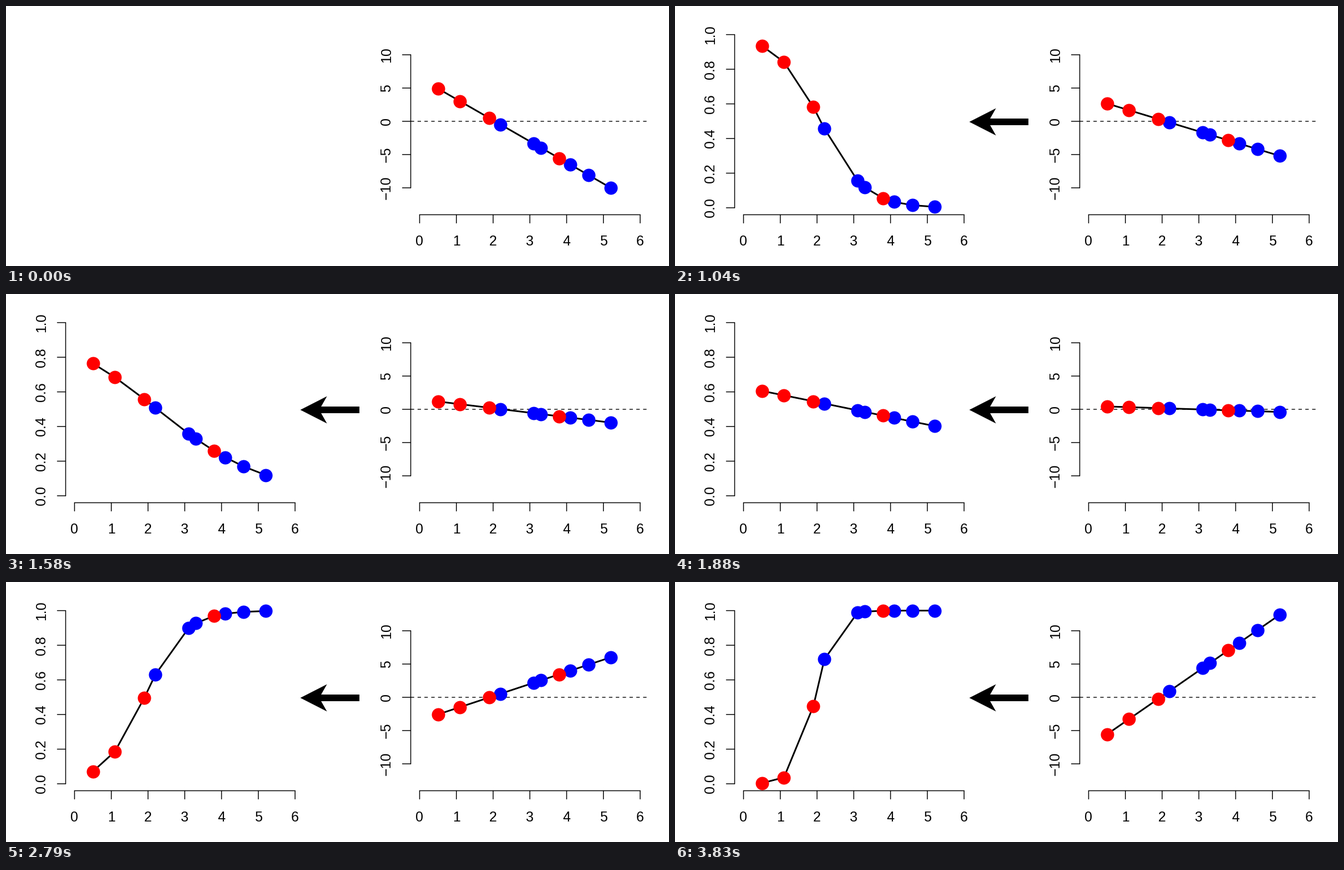
Animation, 1195 px wide and 469 px high, one loop 3870 ms. Source, as a matplotlib script:

```python
import numpy as np
import matplotlib.pyplot as plt
from matplotlib.animation import FuncAnimation
from matplotlib.patches import Polygon, Rectangle

W, H, DPI = 1195, 469, 100
PX = 72 / DPI          # points per pixel
STEP, FRAMES = 30, 129
UNIT = 66.25           # pixels per unit along x

X = np.array([0.5, 1.1, 1.9, 2.2, 3.1, 3.3, 3.8, 4.1, 4.6, 5.2])
RED = np.isin(X, [0.5, 1.1, 1.9, 3.8])

# The line tilts in 14 equal jumps; the first few come slightly late.
K = np.arange(1, 15)
LATE = np.where(K < 3, 2, np.where(K == 3, 1, 0))
TURNS = (np.floor(6.5 * K) + LATE) * 1000 / 24
FADE_START, FADE_LEN = 20, 240

plt.rcParams["font.family"] = "Liberation Sans"
fig = plt.figure(figsize=(W / DPI, H / DPI), dpi=DPI, facecolor="white")
ax = fig.add_axes([0, 0, 1, 1])
ax.set_xlim(0, W)
ax.set_ylim(H, 0)
ax.axis("off")


def stroke(xs, ys, width=1.5, **kw):
    kw.setdefault("solid_capstyle", "round")
    return ax.plot(xs, ys, color="black", lw=width * PX, snap=False, **kw)[0]


def label(x, y, text, angle=0):
    ax.text(x, y, text, fontsize=25 * PX, rotation=angle, ha="center",
            va="baseline", rotation_mode="anchor")


def draw_axes(left, axis_x, ticks):
    """Axes for one chart; ticks is a list of (pixel y, text)."""
    base = 376.5
    stroke([left, left + 6 * UNIT], [base, base])
    for i in range(7):
        x = left + i * UNIT
        stroke([x, x], [base, base + 15])
        label(x, 432, str(i))
    stroke([axis_x, axis_x], [ticks[0][0], ticks[-1][0]])
    for y, text in ticks:
        stroke([axis_x - 15, axis_x], [y, y])
        label(axis_x - 36.3, y, text, 90)


def prob_y(p):
    return 364 - 312.4 * p


def logit_y(v):
    return 208 - 12 * v


class Series:
    def __init__(self, left, to_pixel):
        self.x = left + X * UNIT
        self.to_pixel = to_pixel
        self.line = stroke(self.x, self.x, 3, solid_joinstyle="round", zorder=3)
        dots = dict(ls="none", marker="o", ms=24 * PX, mew=0, zorder=4)
        self.blue = ax.plot([], [], color="#0000ff", **dots)[0]
        self.red = ax.plot([], [], color="#ff0000", **dots)[0]

    def update(self, values):
        y = self.to_pixel(values)
        self.line.set_data(self.x, y)
        self.blue.set_data(self.x[~RED], y[~RED])
        self.red.set_data(self.x[RED], y[RED])


LEFT, RIGHT = 123.5, 745.5
draw_axes(LEFT, 107.5, [(prob_y(i / 5), f"{i / 5:.1f}") for i in range(6)])
draw_axes(RIGHT, 729.5, [(logit_y(v), str(v).replace("-", "\u2212"))
                         for v in range(-10, 11, 5)])
stroke([729.5, 1158.5], [208, 208], 1.4, dashes=(4.4, 4.4),
       dash_capstyle="butt")

ax.add_patch(Polygon([(530.5, 209), (578.5, 184.5), (568, 203), (637, 203),
                      (637, 215), (568, 215), (578.5, 233.5)],
                     fc="black", lw=0))

probs = Series(LEFT, prob_y)
logits = Series(RIGHT, logit_y)
veil = ax.add_patch(Rectangle((0, 0), 645, H, fc="white", lw=0, zorder=9))


def update(i):
    t = i * STEP
    k = np.count_nonzero(t + 10 >= TURNS)
    v = 6.51 - 0.999 * k + (-3.175 + 0.5 * k) * X
    logits.update(v)
    probs.update(1 / (1 + np.exp(-v)))
    veil.set_alpha(1 - np.clip((t - FADE_START) / FADE_LEN, 0, 1))
    return []


anim = FuncAnimation(fig, update, frames=FRAMES, interval=STEP,
                     init_func=lambda: update(0), repeat=True, repeat_delay=0)
plt.show()
```
